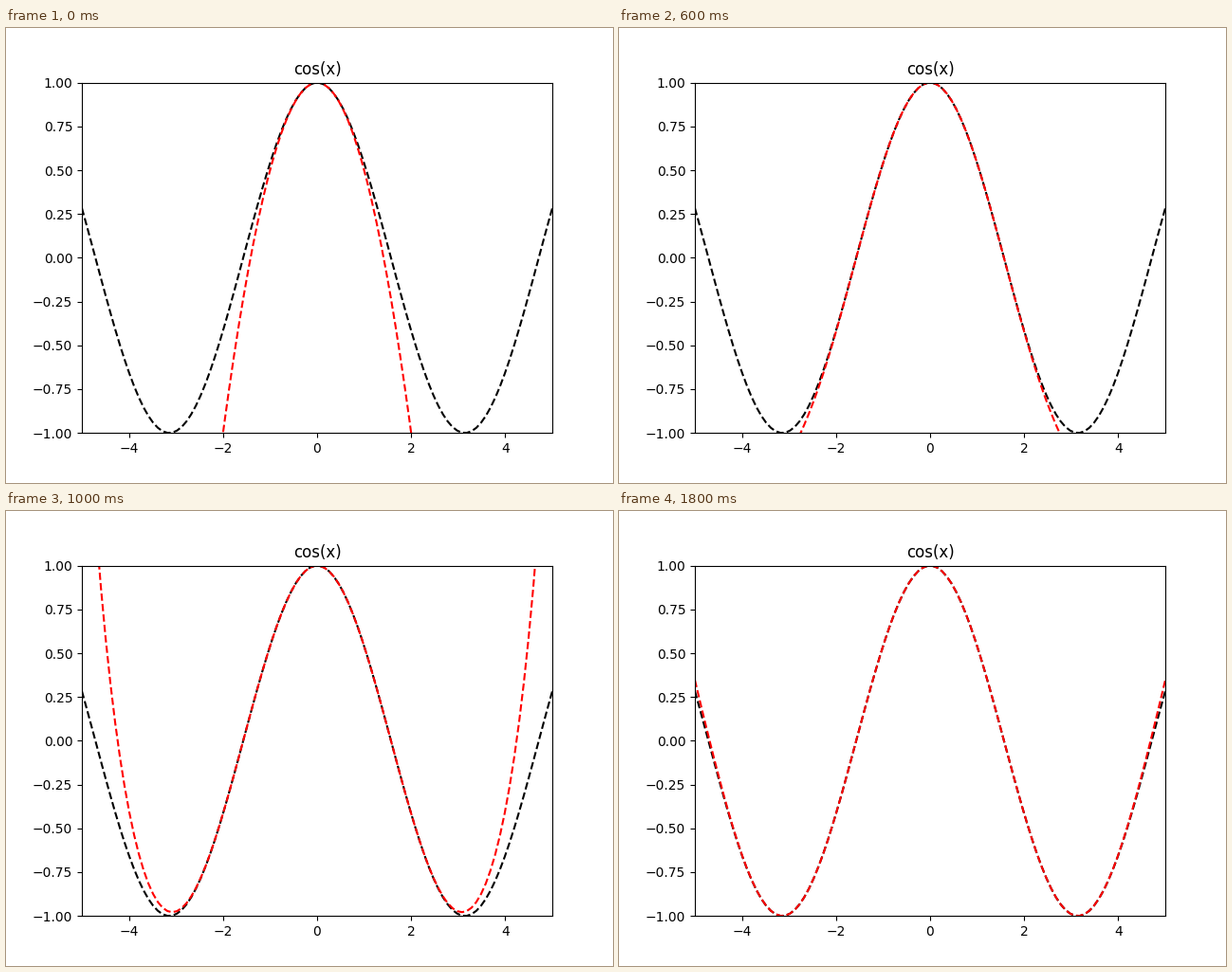
These frames come from a looping animation (640 by 480 pixels, 2000 ms). A matplotlib script:

```python
import math

import matplotlib.pyplot as plt
import numpy as np
from matplotlib.animation import FuncAnimation

FRAMES = 10
INTERVAL = 200

plt.rcParams["font.family"] = "DejaVu Sans"

x = np.linspace(-5, 5, 100)


def taylor_cos(x, order):
    """Taylor polynomial of cos around 0, up to x**(2 * order)."""
    return sum((-1) ** k * x ** (2 * k) / math.factorial(2 * k)
               for k in range(order + 1))


fig, ax = plt.subplots(figsize=(6.4, 4.8), dpi=100)
ax.set_title("cos(x)")
ax.set_xlim(-5, 5)
ax.set_ylim(-1, 1)
ax.plot(x, np.cos(x), "k--")
approx, = ax.plot(x, taylor_cos(x, 1), "r--")


def update(i):
    # The order rises by one every second step, first after one step.
    approx.set_ydata(taylor_cos(x, 1 + (i + 1) // 2))
    return approx,


anim = FuncAnimation(fig, update, frames=FRAMES, interval=INTERVAL,
                     repeat=True, repeat_delay=0, blit=False)

plt.show()
```
